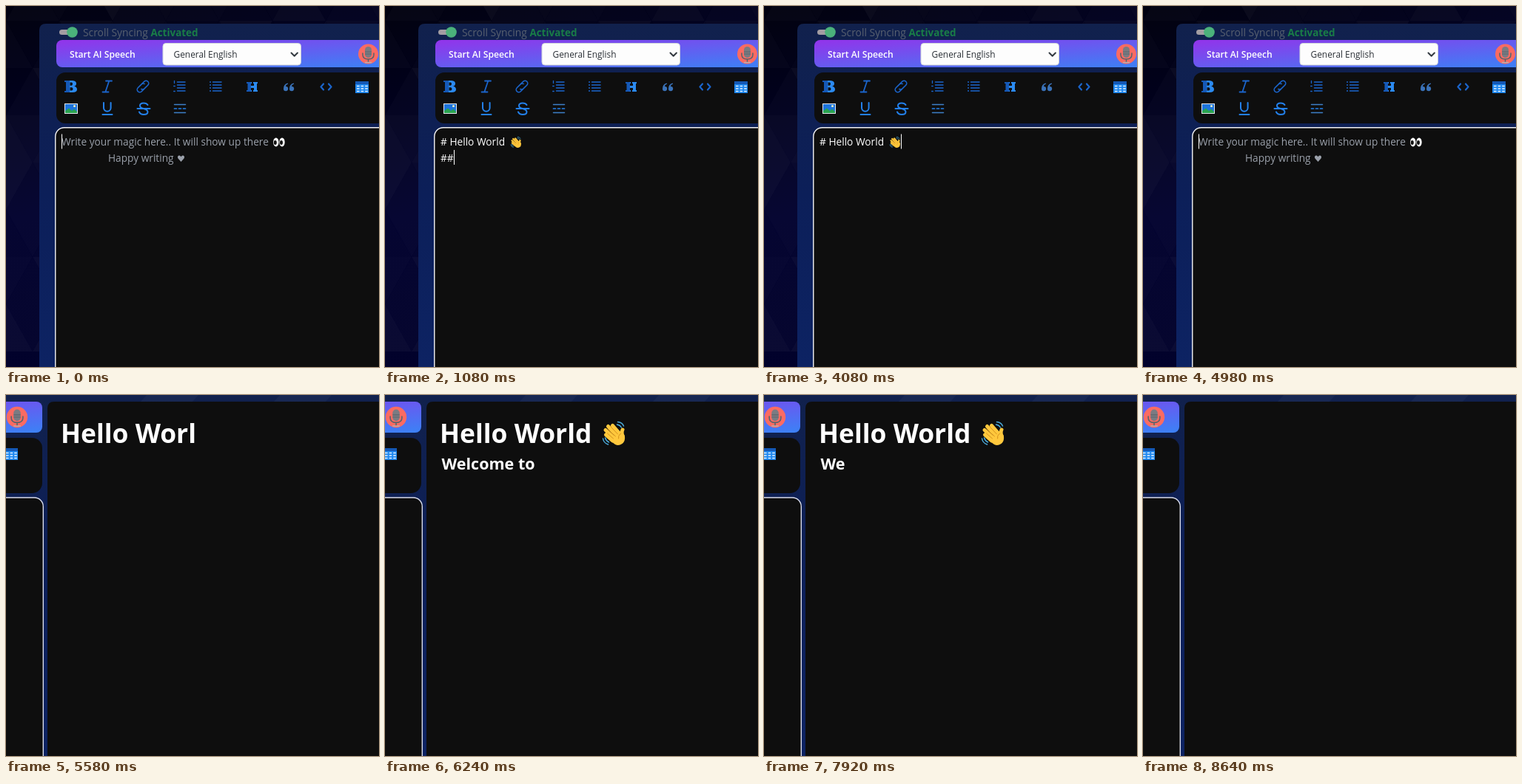
These frames come from a looping animation (504x489 px, 8700 ms). An HTML page:

```html
<!DOCTYPE html>
<html lang="en">
<head>
<meta charset="utf-8">
<title>Markdown editor</title>
<style>
  html, body { margin: 0; width: 100%; height: 100%; overflow: hidden; background: #01010f; }
  svg { display: block; }
  text { font-family: "Open Sans", "Noto Sans", sans-serif; white-space: pre; }
  .body { font-size: 13.7px; }
  .line { fill: none; stroke-linecap: round; stroke-linejoin: round; }
</style>
</head>
<body>
<svg width="504" height="489" viewBox="0 0 504 489">
  <defs>
    <linearGradient id="night" x1="0" y1="0" x2=".3" y2="1">
      <stop offset="0" stop-color="#01010e"/>
      <stop offset=".55" stop-color="#01012e"/>
      <stop offset="1" stop-color="#02022b"/>
    </linearGradient>
    <linearGradient id="panel" x1="0" y1="0" x2="0" y2="1">
      <stop offset="0" stop-color="#11214d"/>
      <stop offset=".5" stop-color="#0c1f59"/>
      <stop offset="1" stop-color="#0d2363"/>
    </linearGradient>
    <linearGradient id="speech" x1="0" y1="0" x2="1" y2="1">
      <stop offset="0" stop-color="#9333ea"/>
      <stop offset="1" stop-color="#3b82f6"/>
    </linearGradient>
    <linearGradient id="split">
      <stop offset=".42" stop-color="#1559b8"/>
      <stop offset=".42" stop-color="#2b8af0"/>
    </linearGradient>

    <symbol id="wave" viewBox="0 0 34 36">
      <g class="line" stroke="#ffc83d">
        <path stroke-width="5" d="M6 20 L15 28 M5.500 13.500 L18 25 M9 8.500 L21 21 M15 7.500 L25 19"/>
        <path stroke-width="5" d="M28.500 13 Q26.500 17 29 23"/>
      </g>
      <path fill="#ffc83d" d="M12 26 L24 15 L31 20 Q33 28 28 32 Q21 37 15 30 Z"/>
      <path class="line" stroke="#d6921d" stroke-width="1" d="M8 18 L16 25 M8.500 12.500 L19 22 M13 9.500 L22 19 M26 18 Q22 21 23 25"/>
      <path class="line" stroke="#4aa9d8" stroke-width="1.500" d="M22 2.500 Q28 3 30 8 M21 6 Q25 6.500 27 10 M2 25 Q3 31 9 33 M5 24 Q6 28 10 30"/>
    </symbol>

    <g id="mic">
      <circle r="13.500" fill="#fb6b62"/>
      <rect x="-4.500" y="-10" width="9" height="15" rx="4.500" fill="#7b7b82"/>
      <path d="M-4.500 -3 H4.500 M-4.500 0 H4.500" stroke="#5d666c"/>
      <path class="line" d="M-7.500 -1 V1 Q-7.500 7 0 7 Q7.500 7 7.500 1 V-1 M0 7 V11" stroke="#56646c" stroke-width="1.500"/>
      <path class="line" d="M-4 11.500 H4" stroke="#b9b0b0" stroke-width="1.500"/>
    </g>

    <g id="table">
      <rect x="-9" y="-8" width="18" height="16" fill="#1e88f0"/>
      <rect x="-9" y="-8" width="18" height="4" fill="#1458b5"/>
      <path d="M-7 -1.500 H8 M-7 2 H8 M-7 5.500 H8" stroke="#e4f1ff" stroke-width="1.700" stroke-dasharray="3.600 2"/>
    </g>
  </defs>

  <g id="editor">
    <rect width="504" height="489" fill="url(#night)"/>
    <g id="triangles"></g>
    <path d="M45 489 V33 Q45 24 54 24 H504 V489 Z" fill="url(#panel)"/>
    <g id="stripes"></g>

    <rect x="72" y="32" width="22" height="7" rx="3.500" fill="#a39ea3"/>
    <circle cx="89.500" cy="35.500" r="7.300" fill="#4bb27b"/>
    <text x="104" y="41" font-size="13.850" fill="#596170">Scroll Syncing</text>
    <text x="195.500" y="41" font-size="13.400" font-weight="700" fill="#197d47">Activated</text>

    <rect x="68" y="46" width="451" height="37" rx="8" fill="url(#speech)"/>
    <text x="86" y="70" font-size="12.200" font-weight="600" fill="#fff">Start AI Speech</text>
    <rect x="212" y="50.500" width="186.500" height="29.500" rx="4" fill="#fdfdfd" stroke="#cfd4da"/>
    <text x="226.500" y="70" font-size="11.900" fill="#2b3036">General English</text>
    <path class="line" d="M385.500 63.500 L389.700 67.700 L393.900 63.500" stroke="#333a40" stroke-width="2"/>
    <use href="#mic" x="489.500" y="65"/>

    <rect x="68" y="90" width="460" height="69" rx="12" fill="#0e0e0e"/>
    <g id="icons">
      <path fill="url(#split)" fill-rule="evenodd" d="M79 101 H90 Q95 101.500 95 105 Q95 108 92 108.800 Q96 109.600 96 113 Q96 117 90 117 H79 V115 H81 V103 H79 Z M86.500 103.500 V107.800 H88.500 Q90 107.500 90 105.500 Q90 103.500 88.500 103.500 Z M86.500 110.200 V114.600 H88.500 Q90.500 114.500 90.500 112.400 Q90.500 110.200 88.500 110.200 Z"/>
      <g class="line" stroke="#1b65cc" stroke-width="1.800">
        <path d="M135 101.500 H143 M130.500 116.500 H138.500 M139.300 101.500 L134.300 116.500"/>
        <g transform="translate(185 109) rotate(-45)" stroke-width="1.600">
          <path d="M2 -3.500 H6 A3.500 3.500 0 0 1 6 3.500 H-1 A3.500 3.500 0 0 1 -4 1"/>
          <path d="M-2 3.500 H-6 A3.500 3.500 0 0 1 -6 -3.500 H1 A3.500 3.500 0 0 1 4 -1"/>
        </g>
        <path d="M231.500 103 H242 M231.500 107 H242 M231.500 111 H242 M231.500 115 H242" stroke-width="1.500"/>
        <path d="M227.500 101.500 V104.500 M226.700 108.500 H228.300 M226.700 115.500 H228.300" stroke-width="1.300"/>
        <path d="M279.500 103 H291 M279.500 107 H291 M279.500 111 H291 M279.500 115 H291" stroke-width="1.500"/>
        <path d="M276 103 h.1 M276 107 h.1 M276 111 h.1 M276 115 h.1"/>
        <path d="M429 105.500 L425.500 109.500 L429 113.500 M436 105.500 L439.500 109.500 L436 113.500" stroke-width="2.200"/>
      </g>
      <path fill="url(#split)" d="M325 103 H332 V105 H331 V108 H335 V105 H334 V103 H340 V105 H339 V114 H340 V116 H334 V114 H335 V111 H331 V114 H332 V116 H325 V114 H326.500 V105 H325 Z"/>
      <g fill="#3a72b8">
        <path id="mark" d="M381 104.500 Q375 105.500 375 112 A3.100 3.100 0 1 0 378 109 Q378 106.500 381 105.700 Z"/>
        <use href="#mark" x="8"/>
      </g>
      <use href="#table" x="481" y="110"/>
      <rect x="79.500" y="132.500" width="17" height="13" fill="#1d74dc" stroke="#e3e8ee"/>
      <path d="M80 145 V142 L85 138.500 L89 142 L92 139.500 L96 143 V145 Z" fill="#2aa34f"/>
      <circle cx="92.500" cy="135.500" r="1.500" fill="#f3f6c8"/>
      <g class="line" stroke="#2380ea" stroke-width="2">
        <path d="M132 131 V138 A4.800 4.800 0 0 0 141.600 138 V131 M130.500 147 H143.500"/>
        <path d="M191.500 134 Q190 131.500 186 131.500 Q181 131.500 181 135 Q181 138 186 139 Q191.500 140.500 191.500 143.500 Q191.500 147 186 147 Q181.500 147 180 143.500 M177.500 139 H194.500"/>
        <path d="M227.500 133.500 H242.500 M227.500 144.500 H242.500" stroke-width="1.500" stroke="#3e80c8"/>
        <path d="M227.500 139 h3 M233.500 139 h3 M239.500 139 h3" stroke-width="1.700"/>
      </g>
    </g>

    <rect x="66.750" y="164.750" width="470" height="350" rx="12" fill="#0e0e0e" stroke="#f2f2f5" stroke-width="1.400"/>
    <g id="hint" fill="#9aa0aa">
      <text class="body" x="75" y="189">Write your magic here.. It will show up there</text>
      <text class="body" x="138" y="211">Happy writing</text>
      <path d="M236.500 211 L232.500 206.500 Q231 203.500 233.500 202.500 Q235.500 202 236.500 204.200 Q237.500 202 239.500 202.500 Q242 203.500 240.500 206.500 Z"/>
      <g fill="#fff">
        <ellipse cx="364.800" cy="184.500" rx="3.700" ry="6"/>
        <ellipse cx="373" cy="184.500" rx="3.700" ry="6"/>
      </g>
      <g fill="#111">
        <ellipse cx="363.800" cy="185" rx="2" ry="3"/>
        <ellipse cx="372" cy="185" rx="2" ry="3"/>
      </g>
    </g>
    <text id="line1" class="body" x="75" y="189" fill="#fff"></text>
    <use id="wave1" href="#wave" x="169" y="176" width="16" height="17"/>
    <text id="line2" class="body" x="75" y="211" fill="#fff"></text>
    <rect id="caret" width="1" height="20" fill="#fff"/>
  </g>

  <g id="preview">
    <rect width="504" height="489" fill="url(#panel)"/>
    <path d="M190 0 H260 L252 9 H182 Z M370 0 H440 L432 9 H362 Z" fill="#fff" opacity=".03"/>
    <rect x="-463" y="9" width="512" height="42" rx="8" fill="url(#speech)"/>
    <use href="#mic" transform="translate(15 30) scale(1.050)"/>
    <rect x="-463" y="58" width="512" height="75" rx="14" fill="#0e0e0e"/>
    <use href="#table" x="7" y="80"/>
    <rect x="-463" y="139" width="513.300" height="400" rx="12" fill="#0e0e0e" stroke="#d9dcec" stroke-width="1.400"/>
    <path d="M56 489 V18 Q56 9 65 9 H504 V489 Z" fill="#0e0e0e"/>
    <g fill="#fff" font-weight="700">
      <text id="title" x="74" y="64.500" font-size="35.400"></text>
      <text id="subtitle" x="76.500" y="100.700" font-size="21.500"></text>
    </g>
    <use id="wave2" href="#wave" x="292.500" y="34" width="34" height="36"/>
  </g>
</svg>

<script>
const LOOP = 8700, STEP = 60, SWITCH = 84;
const TITLE = "Hello World", SUBTITLE = "Welcome to my Mubrelit!";
const LINE1 = "# " + TITLE + " ", LINE2 = "## " + SUBTITLE;
const EMOJI_WIDTH = 19;

// [step, characters]
const EDITOR_KEYS = [[0, 0], [42, 42], [44, 42], [45, 41], [60, 23], [83, 0]];
const PREVIEW_KEYS = [[SWITCH, 0], [115, 31], [135, 10], [144, 0]];

const el = id => document.getElementById(id);
const show = (node, on) => node.setAttribute("visibility", on ? "inherit" : "hidden");

function countAt(keys, step) {
  for (let i = 1; i < keys.length; i++) {
    const [s0, n0] = keys[i - 1], [s1, n1] = keys[i];
    if (step <= s1) return Math.round(n0 + (n1 - n0) * (step - s0) / (s1 - s0));
  }
  return 0;
}

// The leading part of a text that holds the given number of non-space letters.
function takeLetters(text, count) {
  let end = 0;
  for (let i = 0; i < text.length && count > 0; i++) {
    if (text[i] !== " ") { count--; end = i + 1; }
  }
  return text.slice(0, end);
}

function drawTriangles() {
  const side = 72, height = 64;
  let seed = 11, out = "";
  const random = () => (seed = seed * 16807 % 2147483647) / 2147483647;
  for (let row = 0; row < 8; row++) {
    for (let col = -1; col < 14; col++) {
      const x = col * side / 2 - (row % 2) * side / 2, y = row * height - 44;
      const [base, tip] = col % 2 ? [y, y + height] : [y + height, y];
      out += `<path d="M${x} ${base} h${side} L${x + side / 2} ${tip} Z" fill="#fff" opacity="${(random() * .045).toFixed(3)}"/>`;
    }
  }
  el("triangles").innerHTML = out;
}

function drawEditor(n) {
  const second = n > LINE1.length + 1;
  const newLine = n >= LINE1.length + 2;
  const first = el("line1"), next = el("line2");
  first.textContent = LINE1.slice(0, n);
  next.textContent = newLine ? LINE2.slice(0, n - LINE1.length - 2) : "";
  show(el("hint"), n === 0);
  show(el("wave1"), n > LINE1.length);
  const line = second ? next : first;
  const width = line.textContent ? line.getComputedTextLength() : 0;
  const emoji = !second && n > LINE1.length ? EMOJI_WIDTH : 0;
  el("caret").setAttribute("x", Math.round(75 + width + emoji));
  el("caret").setAttribute("y", second ? 195 : 173.5);
}

function drawPreview(n) {
  const letters = TITLE.length - 1;
  el("title").textContent = takeLetters(TITLE, n);
  show(el("wave2"), n > letters);
  el("subtitle").textContent = takeLetters(SUBTITLE, n - letters - 1);
}

function render(time) {
  const step = Math.floor(time % LOOP / STEP);
  const previewing = step >= SWITCH;
  show(el("editor"), !previewing);
  show(el("preview"), previewing);
  if (previewing) drawPreview(countAt(PREVIEW_KEYS, step));
  else drawEditor(countAt(EDITOR_KEYS, step));
}

function tick() {
  render(performance.now());
  requestAnimationFrame(tick);
}

drawTriangles();
tick();
</script>
</body>
</html>
```
